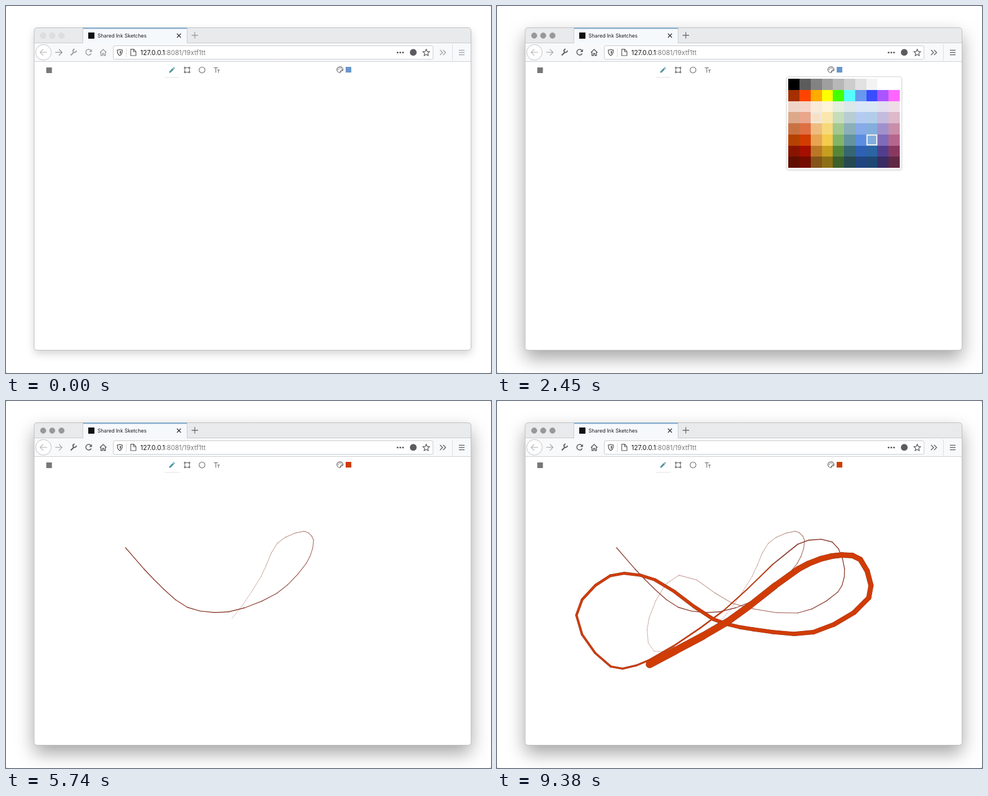
Recreate the animation shown at these times as an HTML page with a canvas. Size 861 px wide and 651 px high, loop 9450 ms.

```html
<!DOCTYPE html>
<html lang="en">
<head>
<meta charset="utf-8">
<title>Shared Ink Sketches</title>
<style>
  html, body { margin: 0; width: 100%; height: 100%; overflow: hidden; background: #fff; }
  canvas { position: absolute; left: 0; top: 0; }
  span { position: absolute; white-space: pre; font-family: Inter, "Open Sans", sans-serif; }
  #title { left: 162.5px; top: 46px; font-size: 9px; line-height: 13px; color: #1d1d20; }
  #url { left: 238.5px; top: 75px; font-size: 11.5px; line-height: 16px; color: #7b7b7d; }
  #url b { font-weight: 400; color: #17171a; }
</style>
</head>
<body>
<canvas id="stage" width="861" height="651"></canvas>
<span id="title">Shared Ink Sketches</span>
<span id="url"><b>127.0.0.1</b>:8081/19xtf1tt</span>
<script>
const ctx = document.getElementById('stage').getContext('2d');
const LOOP = 9450, STEP = 70;
const FOCUS = 1260, OPEN = 1470, PICK = 3150, CLOSE = 3165, CLOSED = 3430;
const BLUE = '#6996cd', RED = '#d03c04', RIM = '#8c3c2e';

const clamp = v => Math.max(0, Math.min(1, v));
const mix = (a, b, u) => a + (b - a) * u;

// Colour picker: greys, brights, then tints and shades of one base row
const parse = text => text.split(' ').map(c => [0, 2, 4].map(i => parseInt(c.slice(i, i + 2), 16)));
const brights = parse('a52f00 ff4400 ffab00 ffff00 44ff00 55ffff 6699ee 3a4cff aa55ff ff66ff');
const base = parse('b54100 d23c00 e8a452 f4cb4c 82b468 62939f 5b8ee0 5892d0 7f6bba b6668c');
const shift = fn => base.map(c => c.map(fn));
const tint = u => shift(v => mix(v, 255, u));
const swatches = [
  base.map((_, i) => Array(3).fill(Math.min(255, 275 * Math.sqrt(i / 9)))),
  brights, tint(.78), tint(.54), tint(.26), base,
  shift(v => Math.max(0, v - 45)),
  shift(v => .71 * Math.max(0, v - 45))
].map(row => row.map(c => `rgb(${c.map(Math.round)})`));

// Freehand stroke: each leg has a time span, a width span, a width curve and key points
const legs = [
  { t: [4900, 5740], w: [1.5, .4], pow: 2, keys: [[212, 260], [262, 316], [322, 366], [395, 374],
    [481, 341], [533, 288], [546, 247], [529, 231], [482, 252], [453, 311], [401, 386]] },
  { t: [5740, 6825], w: [.35, 1.4], pow: 1, keys: [[350, 422], [279, 444], [270, 385], [323, 309],
    [418, 359], [534, 376], [605, 339], [617, 298]] },
  { t: [6825, 8120], w: [1.4, 10], pow: 1.4, keys: [[595, 250], [534, 254], [402, 372], [269, 460],
    [202, 471], [141, 380], [201, 310], [280, 317], [384, 387], [455, 405], [562, 410], [660, 349],
    [645, 281], [595, 275]] },
  { t: [8120, 8470], w: [10, 14], pow: 1, keys: [[535, 298], [410, 391], [271, 467]] }
];
const keys = legs.flatMap(leg => leg.keys);

// Point on the smooth curve between keys i and i + 1
function curve(i, u) {
  const a = keys[i], b = keys[i + 1];
  const reach = .29 * Math.hypot(b[0] - a[0], b[1] - a[1]);
  const handle = (k, sign) => {
    const p = keys[Math.max(0, k - 1)], n = keys[Math.min(keys.length - 1, k + 1)];
    const d = Math.hypot(n[0] - p[0], n[1] - p[1]);
    return keys[k].map((v, j) => v + sign * reach * (n[j] - p[j]) / d);
  };
  const c = handle(i, 1), d = handle(i + 1, -1), v = 1 - u;
  return a.map((_, j) => v ** 3 * a[j] + 3 * v * v * u * c[j] + 3 * v * u * u * d[j] + u ** 3 * b[j]);
}

let key = 0;
for (const leg of legs) {
  const end = key + leg.keys.length - (key ? 0 : 1), parts = 3;
  leg.segs = [];
  leg.len = 0;
  for (; key < end; key++) for (let j = 0; j < parts; j++) {
    const a = curve(key, j / parts), b = curve(key, (j + 1) / parts);
    const len = Math.hypot(b[0] - a[0], b[1] - a[1]);
    leg.segs.push({ a, b, len, at: leg.len });
    leg.len += len;
  }
}

function line(color, width, ...p) {
  ctx.strokeStyle = color;
  ctx.lineWidth = width;
  ctx.beginPath();
  for (let i = 0; i < p.length; i += 2) ctx.lineTo(p[i], p[i + 1]);
  ctx.stroke();
}
function rect(color, x, y, w, h) {
  ctx.fillStyle = color;
  ctx.fillRect(x, y, w, h);
}
function round(x, y, w, h, r, fill, stroke) {
  ctx.beginPath();
  ctx.roundRect(x, y, w, h, r);
  if (fill) { ctx.fillStyle = fill; ctx.fill(); }
  if (stroke) { ctx.strokeStyle = stroke; ctx.lineWidth = 1; ctx.stroke(); }
}
function disc(x, y, r, fill, stroke, width = 1) {
  ctx.beginPath();
  ctx.arc(x, y, r, 0, Math.PI * 2);
  if (fill) { ctx.fillStyle = fill; ctx.fill(); }
  if (stroke) { ctx.strokeStyle = stroke; ctx.lineWidth = width; ctx.stroke(); }
}
function icon(d, color, width = 1.3) {
  ctx.strokeStyle = color;
  ctx.lineWidth = width;
  ctx.stroke(new Path2D(d));
}
function solid(d, color) {
  ctx.fillStyle = color;
  ctx.fill(new Path2D(d));
}
function shadow(color, blur, dy) {
  ctx.shadowColor = color;
  ctx.shadowBlur = blur;
  ctx.shadowOffsetY = dy;
}

function drawWindow(active) {
  rect('#fff', 0, 0, 861, 651);
  for (const x of [0, 860]) for (const y of [0, 650]) rect('#8a8a8a', x, y, 1, 1);

  ctx.save();
  if (active) shadow('rgba(0,0,0,.36)', 32, 14);
  else shadow('rgba(0,0,0,.18)', 15, 6);
  round(50, 38.5, 775.5, 572, 5, '#fff');
  ctx.restore();

  ctx.save();
  ctx.beginPath();
  ctx.roundRect(50, 38.5, 775.5, 572, 5);
  ctx.clip();
  rect('#e9eaec', 50, 38, 776, 28);
  rect('#c8c9cb', 50, 65, 776, 1);
  rect('#f7f9fb', 50, 66, 776, 32);
  rect('#d0d0d2', 50, 98, 776, 1);
  rect('#c8c9cb', 136, 39, 186, 27);
  rect('#f6f9fc', 137, 39, 184, 27);
  ctx.restore();
  round(50, 38.5, 775.5, 572, 5, null, '#bfbfc1');
  rect('#7ba8cd', 137, 38.5, 184, 2);
}

function drawChrome(active) {
  const dark = active ? '#58585b' : '#9b9b9e';
  for (const x of [66, 82, 98.5])
    disc(x, 52.5, 4.9, active ? '#98989a' : '#dedee0', active ? '#8a8a8c' : '#d0d0d2', .6);

  rect('#111', 146, 47, 11, 11);
  icon('M303.500 49l7 7M310.500 49l-7 7', '#38383b', 1.5);
  icon('M329.500 52h11.500M335.200 46.200v11.600', active ? '#6a6a6d' : '#9c9c9f');

  disc(66.5, 82.2, 13.8, '#fff', '#bfbfc2');
  icon('M73 82.200h-12M66 76.700l-5.500 5.500l5.500 5.500', '#bcbcbf');
  icon('M87.500 82.200h12M94 76.700l5.500 5.500l-5.500 5.500', active ? '#aaaaad' : '#8f8f92');

  icon('M115 87.500l5.500-5.500', dark, 2.2);
  icon('M124.800 79a3 3 0 1 1-3-2.600', dark, 1.9);
  icon('M151 79.300a5 5 0 1 0 .3 4.800', dark, 1.5);
  solid('M152.500 76.500v5h-5z', dark);
  icon('M166.800 82.500l5.700-5.500l5.700 5.500M168.500 81.500v6.300h2.700v-3.600h2.600v3.600h2.700v-6.300', dark, 1.4);

  round(190.5, 70.5, 567.5, 24, 2.5, '#fff', '#c9cacc');
  icon('M202 77c-1.500 1-3 1.200-4.500 1.200c0 5 1 8 4.500 9.800c3.500-1.800 4.500-4.800 4.500-9.800c-1.500 0-3-.2-4.500-1.200z', '#56565a');
  solid('M202 79.500c1 .4 1.500.6 2.300.7c0 2.500-.6 4.300-2.300 5.500z', '#56565a');
  rect('#dadadc', 213, 74, 1, 17);
  icon('M221.500 76.700h5.200l4 4v7.300h-9.200zM226.500 77v4h4', '#56565a', 1.2);
  for (const x of [695.2, 700, 704.8]) disc(x, 82.5, 1.6, '#56565a');
  disc(723, 82.2, 6, '#5c5c60');

  ctx.beginPath();
  for (let i = 0; i < 10; i++) {
    const a = i * Math.PI / 5 - Math.PI / 2, r = i % 2 ? 3 : 6.3;
    ctx.lineTo(746 + r * Math.cos(a), 83 + r * Math.sin(a));
  }
  ctx.closePath();
  ctx.strokeStyle = '#56565a';
  ctx.lineWidth = 1.2;
  ctx.stroke();

  icon('M770.500 78l4.500 4.500l-4.500 4.500M776 78l4.500 4.500l-4.500 4.500', dark);
  rect('#dcdddf', 792, 68, 1, 29);
  for (const y of [78.5, 82.5, 86.5]) line(dark, 1.3, 804, y, 814, y);
}

function drawTools(color) {
  const grey = '#68686b';
  rect('#77777a', 71.5, 109, 10, 10);

  solid('M289.700 118.500l.3-2.600l5.800-5.800l2.300 2.300l-5.800 5.800zM296.500 109.400l1.200-1.200l2.300 2.300l-1.200 1.200z', '#5599a9');
  rect('#e2e2e3', 282, 126, 26, 1);

  icon('M318.500 109.500h6M318.500 117.500h6M317.500 110.500v6M325.500 110.500v6', grey, 1);
  for (const x of [316.5, 324.5]) for (const y of [108.5, 116.5]) {
    rect('#fff', x, y, 2, 2);
    ctx.strokeStyle = grey;
    ctx.strokeRect(x, y, 2, 2);
  }
  disc(348, 113.5, 5.2, null, grey, 1.1);
  icon('M368.800 109.500h7.400M372.500 109.500v8.800M375 113.500h4.500M377.300 113.500v5', grey, 1.1);

  icon('M593 118.200c-3.200 0-5.500-2.200-5.500-5.300c0-3 2.300-5.200 5.500-5.200c3 0 5.200 2 5.200 4.700c0 2-1.200 2.700-3 2.700c-2 0-2.200 1-1.500 1.800c.4.700.1 1.300-.7 1.300z', '#4c4c50', 1.1);
  for (let i = 0; i < 4; i++) {
    const a = Math.PI * (1 + i / 3);
    disc(593 + 3 * Math.cos(a), 112.5 + 2.7 * Math.sin(a), .8, '#4c4c50');
  }
  rect(color, 603, 108, 10, 10);
}

function drawPicker(t) {
  if (t < OPEN || t >= CLOSED) return;
  const shown = t < CLOSE ? clamp((t - OPEN) / 210) : 1 - clamp((t - CLOSE) / 265);
  const size = 19.75, left = 517.4, top = 129;
  ctx.save();
  ctx.globalAlpha = shown;
  ctx.translate(0, -Math.round(5 * (1 - shown)));
  ctx.save();
  shadow('rgba(0,0,0,.12)', 4, 1);
  round(514, 125.5, 204.5, 165, 3.5, '#fff');
  ctx.restore();
  round(514, 125.5, 204.5, 165, 3.5, null, '#d8d8da');

  const colX = i => Math.round(left + i * size), rowY = i => Math.round(top + i * size);
  swatches.forEach((row, r) => row.forEach((c, i) =>
    rect(c, colX(i), rowY(r), colX(i + 1) - colX(i), rowY(r + 1) - rowY(r))));

  const mark = (col, row, edge) => {
    const x = left + col * size, y = top + row * size;
    rect('rgba(255,255,255,.26)', x, y, size, size);
    ctx.strokeStyle = edge;
    ctx.lineWidth = 2;
    ctx.strokeRect(x + 1.2, y + 1.2, size - 2.4, size - 2.4);
  };
  mark(t < PICK ? 7 : 1, 5, '#f6f3ee');
  if (t > OPEN + 140 && t < PICK) {
    const glide = clamp((t - 1900) / 850);
    mark(Math.round(mix(3, 1, glide)), Math.round(5 * glide), '#ececec');
  }
  ctx.restore();
}

function drawStroke(t) {
  ctx.save();
  ctx.lineCap = ctx.lineJoin = 'round';
  for (const leg of legs) {
    const reach = leg.len * clamp((t - leg.t[0]) / (leg.t[1] - leg.t[0]));
    for (const core of [false, true]) for (const s of leg.segs) {
      const part = clamp((reach - s.at) / s.len);
      if (!part) break;
      const w = mix(...leg.w, ((s.at + s.len / 2) / leg.len) ** leg.pow);
      if (core && w < 2) continue;
      ctx.globalAlpha = core ? 1 : clamp(.15 + .65 * w);
      line(core ? RED : RIM, core ? w - .8 : Math.max(w, .8),
        ...s.a, mix(s.a[0], s.b[0], part), mix(s.a[1], s.b[1], part));
    }
  }
  ctx.restore();
}

function draw(now) {
  const t = Math.floor((now % LOOP) / STEP) * STEP;
  const active = t >= FOCUS;
  drawWindow(active);
  drawChrome(active);
  drawTools(t < PICK ? BLUE : RED);
  drawPicker(t);
  drawStroke(t);
}

const start = performance.now();
function tick() {
  draw(performance.now() - start);
  requestAnimationFrame(tick);
}
tick();
</script>
</body>
</html>
```
